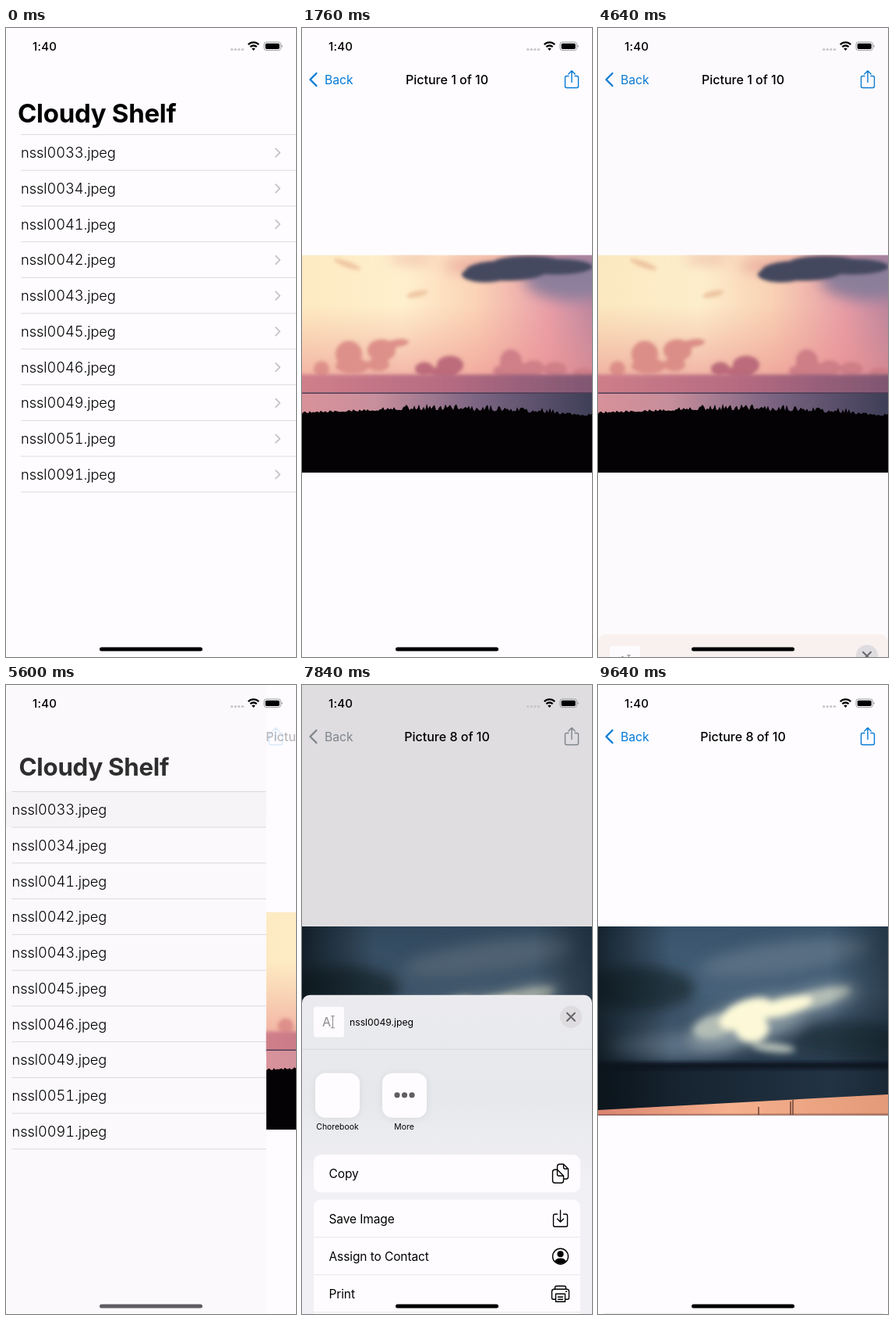
An HTML page for the animation above (9680 ms loop, 372x805 px).

```html
<!DOCTYPE html>
<html lang="en">
<head>
<meta charset="utf-8">
<title>Picture list</title>
<style>
  html, body { margin: 0; width: 100%; height: 100%; overflow: hidden; background: #fefcff; }
  #stage { display: block; width: 100%; height: 100%; }
  text { font-family: Inter, sans-serif; white-space: pre; }
  .line { fill: none; stroke-linecap: round; stroke-linejoin: round; }
  .row { font-size: 18.3px; font-weight: 300; letter-spacing: -.1px; font-variant-numeric: tabular-nums; }
  .action { font-size: 15.5px; letter-spacing: -.1px; }
  .label { font-size: 10.4px; text-anchor: middle; }
</style>
</head>
<body>
<svg id="stage" viewBox="0 0 372 805">
  <defs>
    <filter id="soft" x="-40%" y="-80%" width="180%" height="260%"><feGaussianBlur stdDeviation="9"/></filter>
    <filter id="medium" x="-30%" y="-60%" width="160%" height="220%"><feGaussianBlur stdDeviation="4.5"/></filter>
    <filter id="fine" x="-20%" y="-40%" width="140%" height="180%"><feGaussianBlur stdDeviation="2"/></filter>
    <filter id="shadow" x="-30%" y="-30%" width="160%" height="160%"><feDropShadow dx="0" dy="1" stdDeviation="4" flood-opacity=".07"/></filter>
    <linearGradient id="dusk">
      <stop stop-color="#fdeac2"/><stop offset=".35" stop-color="#fff0cd"/><stop offset=".6" stop-color="#fbd3b6"/>
      <stop offset=".85" stop-color="#e99ea8"/><stop offset="1" stop-color="#bd87a0"/>
    </linearGradient>
    <linearGradient id="glow" x2="0" y2="1">
      <stop offset=".35" stop-color="#ee9a8e" stop-opacity="0"/><stop offset="1" stop-color="#ea8b8f" stop-opacity=".75"/>
    </linearGradient>
    <linearGradient id="band">
      <stop stop-color="#d0808a"/><stop offset=".5" stop-color="#b56b82"/><stop offset="1" stop-color="#7d5672"/>
    </linearGradient>
    <linearGradient id="sea">
      <stop stop-color="#d9929a"/><stop offset=".25" stop-color="#c88f9c"/><stop offset=".6" stop-color="#7c6583"/><stop offset="1" stop-color="#3f3f58"/>
    </linearGradient>
    <linearGradient id="gloom" x2="0" y2="1">
      <stop stop-color="#38536b"/><stop offset=".35" stop-color="#48627a"/><stop offset=".75" stop-color="#26384a"/>
    </linearGradient>
    <linearGradient id="edges">
      <stop stop-color="#0a1319" stop-opacity=".75"/><stop offset=".25" stop-color="#0a1319" stop-opacity="0"/>
      <stop offset=".8" stop-color="#0a1319" stop-opacity="0"/><stop offset="1" stop-color="#0a1319" stop-opacity=".45"/>
    </linearGradient>
    <linearGradient id="rain"><stop stop-color="#101b25"/><stop offset="1" stop-color="#27394b"/></linearGradient>
    <linearGradient id="field"><stop stop-color="#d98470"/><stop offset=".45" stop-color="#f6b08d"/><stop offset="1" stop-color="#e39a78"/></linearGradient>
    <linearGradient id="sheet0" x2="0" y2="1">
      <stop stop-color="#f9f1ee"/><stop offset=".16" stop-color="#f6f0f0"/><stop offset=".4" stop-color="#eceaef"/><stop offset=".6" stop-color="#f3f1f5"/>
    </linearGradient>
    <linearGradient id="sheet1" x2="0" y2="1">
      <stop stop-color="#ebebef"/><stop offset=".3" stop-color="#e6e8eb"/><stop offset=".55" stop-color="#f1f0f4"/>
    </linearGradient>
  </defs>

  <rect width="372" height="805" fill="#fefcff"/>
  <g id="list">
    <rect id="selection" width="372" height="45.75" fill="#d1d0d5"/>
    <path d="M19 136.4H372" stroke="#dddbdf"/>
    <g id="rows"></g>
  </g>
  <rect id="listShade" width="372" height="805"/>

  <g id="detail">
    <rect width="372" height="805" fill="#fefcff"/>
    <svg id="photo0" y="290.5" width="372" height="278.5">
      <rect width="372" height="180" fill="url(#dusk)"/>
      <rect width="372" height="180" fill="url(#glow)"/>
      <g id="duskHaze" filter="url(#soft)"></g>
      <g id="duskClouds" filter="url(#fine)"></g>
      <rect x="-9" y="153" width="390" height="26" fill="url(#band)" filter="url(#fine)"/>
      <rect y="176" width="372" height="40" fill="url(#sea)"/>
      <rect y="176" width="372" height="1.5" fill="#4d3a55"/>
      <path id="land" fill="#040205"/>
    </svg>
    <svg id="photo1" y="309" width="372" height="241.5">
      <rect width="372" height="242" fill="url(#gloom)"/>
      <g id="gloomClouds" filter="url(#soft)"></g>
      <g id="gloomLight" filter="url(#medium)"></g>
      <rect y="178" width="372" height="64" fill="url(#rain)"/>
      <rect x="-9" y="174" width="390" height="8" fill="#0c1620" filter="url(#fine)"/>
      <rect width="372" height="242" fill="url(#edges)"/>
      <path d="M0 235L372 215V242H0Z" fill="url(#field)"/>
      <path d="M0 240L372 239V242H0Z" fill="#7d4a40" opacity=".4"/>
      <path d="M206 231v10M247 224v17M250 222v19" stroke="#6b4038" stroke-width="1.5"/>
    </svg>
  </g>

  <text id="largeTitle" font-size="33" font-weight="700" letter-spacing="-.3">Cloudy Shelf</text>
  <text id="title" y="71.5" font-size="16" font-weight="550" text-anchor="middle"></text>
  <g id="back">
    <path id="backArrow" class="line" d="M18.5 58L10.5 66L18.5 74" stroke-width="2.3"/>
    <text id="backLabel" font-size="15.7">Back</text>
  </g>
  <path id="share" class="line" d="M342 61.5h-2.5a2 2 0 0 0-2 2v11a2 2 0 0 0 2 2h13a2 2 0 0 0 2-2v-11a2 2 0 0 0-2-2H350M346 69.5V55M341.8 59l4.2-4.2 4.2 4.2" stroke-width="1.4"/>

  <rect id="dim" width="372" height="805"/>

  <g id="sheet">
    <path id="sheetBack" d="M0 805V380a10 10 0 0 1 10-10H362a10 10 0 0 1 10 10V805Z"/>
    <rect x="15" y="385" width="39" height="39" rx="3" fill="#fdfbfd"/>
    <text x="26" y="410.5" font-size="16" fill="#8b8a8e">A</text>
    <path class="line" d="M37.5 397h4M39.5 397v15M37.5 412h4" stroke="#8b8a8e"/>
    <text id="fileName" x="61" y="409.5" font-size="12.2"></text>
    <circle cx="345" cy="398" r="14.2" fill="#dfdce0"/>
    <path class="line" d="M340 393l10 10M350 393l-10 10" stroke="#66656a" stroke-width="2"/>
    <path d="M0 439.5H372" stroke="#d9d6da"/>
    <g fill="#fefcff" filter="url(#shadow)">
      <rect x="17" y="470" width="57" height="57" rx="13"/>
      <rect x="103" y="470" width="57" height="57" rx="13"/>
    </g>
    <g fill="#5f5e62"><circle cx="122" cy="498" r="3.6"/><circle cx="131.5" cy="498" r="3.6"/><circle cx="141" cy="498" r="3.6"/></g>
    <text class="label" x="45.5" y="542">Chorebook</text>
    <text class="label" x="131" y="542">More</text>
    <rect x="15" y="574.5" width="342" height="48" rx="9" fill="#fefcff"/>
    <rect x="15" y="632" width="342" height="240" rx="9" fill="#fefcff"/>
    <path d="M15 680H357M15 728H357M15 776H357" stroke="#e6e4e8"/>
    <g id="actions"></g>
  </g>

  <text x="34" y="29" font-size="15" font-weight="550" letter-spacing=".2">1:40</text>
  <g fill="#c5c4c8"><circle cx="289.7" cy="27.5" r="1.6"/><circle cx="294.3" cy="27.5" r="1.6"/><circle cx="298.9" cy="27.5" r="1.6"/><circle cx="303.5" cy="27.5" r="1.6"/></g>
  <path d="M310.8 21.2a9.5 9.5 0 0 1 13.4 0M313.4 24.2a5.8 5.8 0 0 1 8.2 0" fill="none" stroke="#000" stroke-width="2.3"/>
  <path d="M317.5 29l-2.2-2.4a3 3 0 0 1 4.4 0Z"/>
  <rect x="331" y="18" width="21.5" height="10.6" rx="3" fill="none" stroke="#929195" stroke-width=".9"/>
  <rect x="332.7" y="19.7" width="18.1" height="7.2" rx="1.6"/>
  <path d="M353.6 21.5a2 2 0 0 1 0 3.6Z" fill="#929195"/>
  <rect id="indicator" x="120" y="792.5" width="132" height="5" rx="2.5"/>
</svg>

<script>
const LOOP = 9680, FRAME = 40, WIDTH = 372, ROW = 45.75, LIST_TOP = 136.4, SHEET_HEIGHT = 435;
const $ = id => document.getElementById(id);
const set = (id, attrs) => { for (const k in attrs) $(id).setAttribute(k, attrs[k]); };
const clamp = v => Math.min(1, Math.max(0, v));
const mix = (a, b, k) => a + (b - a) * k;
const move = (x, y) => `translate(${x} ${y})`;

const files = ['33', '34', '41', '42', '43', '45', '46', '49', '51', '91'].map(n => `nssl00${n}.jpeg`);
$('rows').innerHTML = files.map((name, i) => `<g transform="${move(0, LIST_TOP + i * ROW)}">
  <path d="M19 ${ROW}H372" stroke="#dddbdf"/>
  <text class="row" x="19" y="29.8">${name}</text>
  <path class="line" d="M346 18l5.2 5.2-5.2 5.2" stroke="#c4c3c7" stroke-width="1.8"/></g>`).join('');

// Icons are drawn around their own centre.
const actions = [
  ['Copy', 598.5, '<path d="M-4-5h-3a3 3 0 0 0-3 3V9a3 3 0 0 0 3 3H1a3 3 0 0 0 3-3V7M-4-5L4 3M-4-5v6a2 2 0 0 0 2 2H4V7M-4-5v-4a3 3 0 0 1 3-3H4l6 6V4a3 3 0 0 1-3 3H4M4-12v4a2 2 0 0 0 2 2h4"/>'],
  ['Save Image', 656.5, '<path d="M-4-6h-3a2 2 0 0 0-2 2V8a2 2 0 0 0 2 2H7a2 2 0 0 0 2-2V-4a2 2 0 0 0-2-2H4M0-11V4M-4 0l4 4 4-4"/>'],
  ['Assign to Contact', 704.5, '<circle r="10"/><path d="M-6.5 6a7 5 0 0 1 13 0a9 9 0 0 1-13 0Z" fill="#000"/><circle cy="-3" r="3.4" fill="#000"/>'],
  ['Print', 752.5, '<path d="M-6 7h-3a2 2 0 0 1-2-2V-3a3 3 0 0 1 3-3H8a3 3 0 0 1 3 3V5a2 2 0 0 1-2 2H6M-7-6v-2a2 2 0 0 1 2-2H5a2 2 0 0 1 2 2v2M-6 0H6V10H-6ZM-3 4H3M-3 7H3M7-3h1"/>'],
  ['Save to Files', 800.5, '<path d="M-11 8V-6a2 2 0 0 1 2-2h5l2 2H9a2 2 0 0 1 2 2V8ZM-11-2H11"/>'],
];
$('actions').innerHTML = actions.map(([name, y, icon]) => `<text class="action" x="34.5" y="${y + 5.8}">${name}</text>
  <g class="line" stroke="#000" stroke-width="1.4" transform="${move(331.5, y)}">${icon}</g>`).join('');

const puffs = (id, color, list) => {
  $(id).innerHTML += list.map(([x, y, rx, ry = rx, turn = 0]) =>
    `<ellipse rx="${rx}" ry="${ry}" fill="${color}" transform="${move(x, y)} rotate(${turn})"/>`).join('');
};
puffs('duskHaze', '#8d7f9c', [[345, 30, 60, 28]]);
puffs('duskHaze', '#e8a79d', [[140, 5, 30, 4], [225, 14, 45, 8]]);
puffs('duskClouds', '#f0c8a4', [[58, 12, 18, 4, 20], [148, 50, 14, 4, -12]]);
puffs('duskClouds', '#454860', [[262, 20, 52, 13], [235, 25, 30, 10], [325, 15, 48, 10], [290, 10, 45, 9]]);
puffs('duskClouds', '#dd9089', [[60, 127, 17], [65, 142, 22, 10], [102, 122, 18, 14], [122, 113, 15, 5, -8], [98, 140, 14, 9], [25, 146, 10]]);
puffs('duskClouds', '#bd6c7c', [[157, 146, 12, 9], [190, 141, 17, 12], [182, 150, 18, 8]]);
puffs('duskClouds', '#cf7f88', [[268, 136, 14, 15], [275, 149, 30, 11], [297, 145, 14, 10], [325, 146, 15, 9], [362, 152, 14, 8]]);

puffs('gloomClouds', '#24343f', [[50, 80, 75, 30], [325, 145, 75, 22]]);
puffs('gloomClouds', '#5a6f83', [[95, 152, 85, 18], [240, 40, 110, 20, -8]]);
puffs('gloomClouds', '#8797a0', [[195, 122, 82, 28, -16], [275, 95, 60, 16, -14]]);
puffs('gloomLight', '#b3bdb5', [[150, 128, 28, 14, -15], [270, 95, 55, 10, -15], [225, 155, 28, 6, 6]]);
puffs('gloomLight', '#fdf9d8', [[190, 112, 36, 17, -22], [197, 130, 22, 18], [238, 103, 38, 11, -15]]);

const noise = n => { const v = Math.sin(n * 127.1) * 43758.5; return v - Math.floor(v); };
let land = 'M0 279';
for (let x = 0; x <= WIDTH; x += 2) {
  const height = x > 100 && x < 330 ? 8 : 3;
  land += `L${x} ${203 - 6 * Math.sin(Math.PI * x / WIDTH) + x / 120 - height * noise(x) ** 2}`;
}
set('land', { d: land + 'L372 279Z' });

// Critically damped spring from 0 to 1.
const spring = (t, start) => {
  const x = Math.max(0, t - start) * .01826;
  const v = 1 - (1 + x) * Math.exp(-x);
  return v > .998 ? 1 : v;
};
const detailAt = t => t < 5000 ? spring(t, 1263) : t < 6100 ? 1 - spring(t, 5389) : spring(t, 6183);
const sheetAt = t => t < 4000 ? spring(t, 2270) : t < 7000 ? 1 - spring(t, 4400)
  : t < 9100 ? spring(t, 7594) : 1 - spring(t, 9200);

function draw(t) {
  const p = detailAt(t), away = 1 - p, s = sheetAt(t);
  const popping = t >= 5280 && t < 6160;
  const second = t >= 6160 ? 1 : 0, index = second ? 7 : 0;

  set('list', { transform: move(-.3 * WIDTH * p, 0) });
  set('listShade', { opacity: .1 * p });
  set('selection', { y: LIST_TOP + index * ROW, opacity: t < 1240 ? 0 : popping ? p : 1 });
  set('detail', { transform: move(WIDTH * away, 0), display: p > 0 ? 'inline' : 'none' });
  set('photo' + second, { display: 'inline' });
  set('photo' + (1 - second), { display: 'none' });

  set('largeTitle', {
    transform: `${move(mix(15, 29, p), mix(121, 72, p))} scale(${mix(1, .5, p)})`,
    opacity: clamp((away - .45) / .55),
  });
  $('title').textContent = `Picture ${index + 1} of 10`;
  set('title', { x: 186 + away * WIDTH * (popping ? .6 : .42), opacity: p ** .6 });

  const tint = `rgb(${mix(4, 154, s)},${mix(122, 153, s)},${mix(215, 156, s)})`;
  const backPressed = t >= 5280 && t < 5389;
  const sharePressed = t >= 2160 && t < 2270 || t >= 7400 && t < 7594;
  set('back', { opacity: clamp((p - .4) / .6) * (backPressed ? .3 : 1) });
  set('backArrow', { stroke: tint, transform: move(60 * away, 2 * away) });
  set('backLabel', { fill: tint, transform: `${move(29 + 25 * away, mix(71.7, 105, away))} scale(${1 + away})` });
  set('share', { stroke: tint, opacity: clamp(p * 1.4) * (sharePressed ? .3 : 1) });

  set('dim', { opacity: .13 * s });
  set('sheet', { transform: move(0, SHEET_HEIGHT * (1 - s)), display: s > 0 ? 'inline' : 'none' });
  set('sheetBack', { fill: `url(#sheet${second})` });
  $('fileName').textContent = files[index];
  set('indicator', { fill: p > 0 && p < 1 ? '#5f5d63' : '#000' });
}

function tick() {
  const t = performance.now() % LOOP;
  draw(Math.floor(t / FRAME) * FRAME);
  requestAnimationFrame(tick);
}
tick();
</script>
</body>
</html>
```
